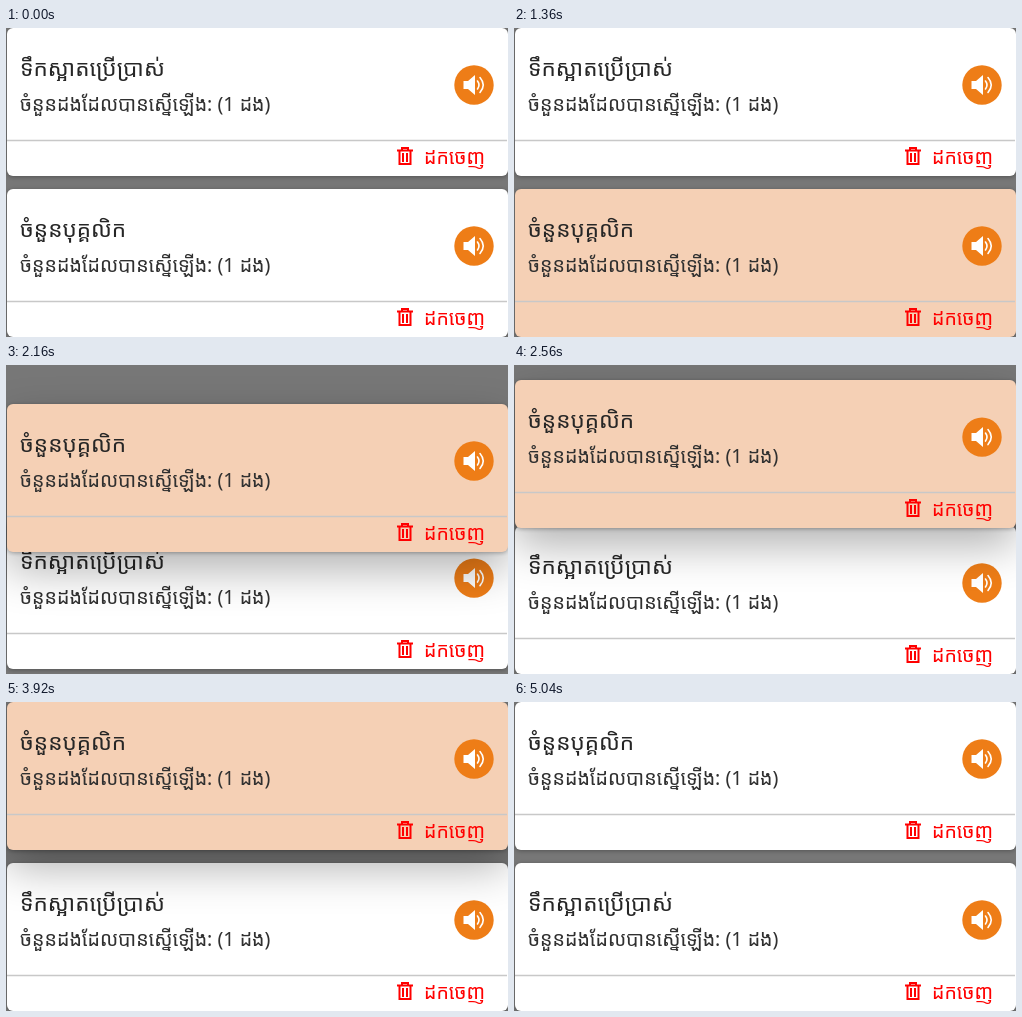
An HTML page for the animation above (5120 ms loop, 502 by 309 pixels).

```html
<!DOCTYPE html>
<html lang="km">
<head>
<meta charset="utf-8">
<title>Drag to reorder</title>
<style>
  html, body { margin: 0; width: 100%; height: 100%; overflow: hidden; background: #777; }
  .stage {
    position: relative; width: 502px; height: 309px; overflow: hidden; background: #777;
    --rest: 0 1px 4px rgba(0, 0, 0, .3), 0 0 0 transparent;
    --raised: 0 1px 4px rgba(0, 0, 0, .3), 0 18px 44px rgba(0, 0, 0, .3);
  }
  .card {
    position: absolute; left: .5px; top: 0; width: 501px; height: 148px;
    border-radius: 6px; background: #fff; box-shadow: var(--rest);
    animation: 5120ms linear infinite paused;
  }
  svg { display: block; margin-left: -.5px; }
  text { font-family: "Noto Sans", "Noto Sans Khmer", sans-serif; }
  .title { font-size: 22.5px; font-weight: 500; fill: #262626; }
  .note { font-size: 19.6px; fill: #303030; }
  .remove { font-size: 19.5px; font-weight: 500; fill: #f00; }

  .under { animation-name: swap; }
  .lifted { animation-name: drag, tint, lift; }

  @keyframes swap {
    0%, 35.4% { transform: translateY(0); animation-timing-function: cubic-bezier(.215, .61, .355, 1); }
    44.8%, 100% { transform: translateY(161px); }
  }
  @keyframes drag {
    0%, 27% { transform: translateY(161px); }
    34.375% { transform: translateY(84px); }
    42.1875% { transform: translateY(39px); animation-timing-function: ease-out; }
    54%, 61.5% { transform: translateY(10.5px); animation-timing-function: ease-out; }
    65.5%, 100% { transform: translateY(0); }
  }
  @keyframes tint {
    0%, 18% { background: #fff; }
    22%, 90% { background: #f5d0b5; }
    95%, 100% { background: #fff; }
  }
  @keyframes lift {
    0%, 27% { box-shadow: var(--rest); }
    32%, 90% { box-shadow: var(--raised); }
    95%, 100% { box-shadow: var(--rest); }
  }
</style>
</head>
<body>
<div class="stage">
  <div class="card under">
    <svg width="502" height="148">
      <defs>
        <g id="common">
          <text class="note" x="14" y="82.500">ចំនួនដងដែលបានស្នើឡើង: (1 ដង)</text>
          <path d="M1 112.500H501" stroke="#c8c8c8" stroke-width="1.5"/>
          <circle cx="468" cy="57" r="19.7" fill="#ee7d17"/>
          <path d="M457.500 53h4.500l7-6v20l-7-6h-4.500z" fill="#fff"/>
          <path d="M471.500 53q3 4 0 8M474 49.500q6.500 7.500 0 15" fill="none" stroke="#fff" stroke-width="1.6" stroke-linecap="round"/>
          <path d="M391 122.500h16M396 122v-2h6v2M393.500 123v13h11v-13M397 125v9M401 125v9" fill="none" stroke="#f00" stroke-width="2"/>
          <text class="remove" x="418" y="136">ដកចេញ</text>
        </g>
      </defs>
      <text class="title" x="14" y="47.500">ទឹកស្អាតប្រើប្រាស់</text>
      <use href="#common"/>
    </svg>
  </div>
  <div class="card lifted">
    <svg width="502" height="148">
      <text class="title" x="14" y="47.500">ចំនួនបុគ្គលិក</text>
      <use href="#common"/>
    </svg>
  </div>
</div>
<script>
  const LOOP = 5120, STEP = 80;
  const moves = document.getAnimations();

  function tick() {
    const now = performance.now() % LOOP;
    const time = Math.floor(now / STEP) * STEP;
    for (const move of moves) move.currentTime = time;
    requestAnimationFrame(tick);
  }
  tick();
</script>
</body>
</html>
```
